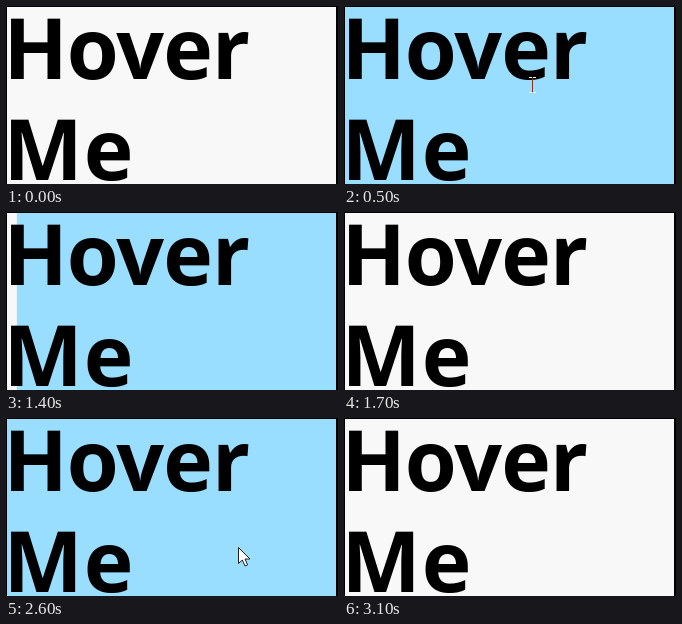
An HTML page for the animation above (3700 ms loop, 332 by 178 pixels).

```html
<!DOCTYPE html>
<html lang="en">
<head>
<meta charset="utf-8">
<title>Hover Me</title>
<style>
  html, body { margin: 0; width: 100%; height: 100%; overflow: hidden; }
  .card {
    position: relative; width: 332px; height: 178px; overflow: hidden;
    box-sizing: border-box; background: #f8f8f8;
    border: solid #000; border-width: 1px 2px 0 1px;
  }
  .fill {
    position: absolute; inset: 0; background: #99ddff;
    animation: sweep 3.7s ease infinite paused;
  }
  svg { position: absolute; left: -1px; top: -1px; overflow: visible; }
  text { font: bold 84px "Open Sans", "Noto Sans", sans-serif; }
  .arrow { animation: arrow 3.7s step-end infinite paused; }
  .beam { animation: beam 3.7s step-end infinite paused; }

  /* grows from the left on enter, leaves to the right */
  @keyframes sweep {
    0%, 5.595% { clip-path: inset(0 100% 0 0); }
    12.351%, 37.568% { clip-path: inset(0 0 0 0); }
    43.919%, 50% { clip-path: inset(0 0 0 100%); }
    50.01%, 55.892% { clip-path: inset(0 100% 0 0); }
    62.649%, 75.459% { clip-path: inset(0 0 0 0); }
    82.216%, 100% { clip-path: inset(0 0 0 100%); }
  }
  @keyframes arrow {
    0% { transform: translate(-40px, 0); }
    5.4% { transform: translate(318px, 104px); }
    8.1% { transform: translate(240px, 88px); }
    10.8% { transform: translate(-40px, 0); }
    29.7% { transform: translate(228px, 86px); }
    32.4% { transform: translate(272px, 92px); }
    35.1% { transform: translate(310px, 98px); }
    37.8% { transform: translate(-40px, 0); }
    56.7% { transform: translate(246px, 152px); }
    59.4% { transform: translate(229px, 126px); }
    62.1% { transform: translate(230px, 127px); }
    64.8% { transform: translate(231px, 128px); }
    70.2% { transform: translate(232px, 129px); }
    72.9% { transform: translate(240px, 152px); }
    75.6%, 100% { transform: translate(-40px, 0); }
  }
  @keyframes beam {
    0% { transform: translate(-40px, 0); }
    10.8% { transform: translate(197px, 81px); }
    13.5% { transform: translate(188px, 79px); }
    27% { transform: translate(196px, 81px); }
    29.7%, 100% { transform: translate(-40px, 0); }
  }
</style>
</head>
<body>
<div class="card">
  <div class="fill"></div>
  <svg width="332" height="178">
    <text x="-2.5" y="73" letter-spacing="-0.9">Hover</text>
    <text x="-2.5" y="174" letter-spacing="1">Me</text>
    <g class="beam" fill="none">
      <path d="M-3 -7.5H0M1 -7.5H4M-3 7.5H0M1 7.5H4" stroke="#fff"/>
      <path d="M.5 -7V7" stroke="#8a3020"/>
    </g>
    <path class="arrow" d="M.5 .5V16.5L4.3 13L7 19L9.6 17.9L7 12H12Z" fill="#fff" stroke="#222"/>
  </svg>
</div>
<script>
  // The picture refreshes ten times a second.
  const TICK = 100;
  const anims = document.getAnimations();
  function draw() {
    const t = Math.floor(performance.now() / TICK) * TICK + 1;
    for (const a of anims) a.currentTime = t;
    requestAnimationFrame(draw);
  }
  draw();
</script>
</body>
</html>
```
